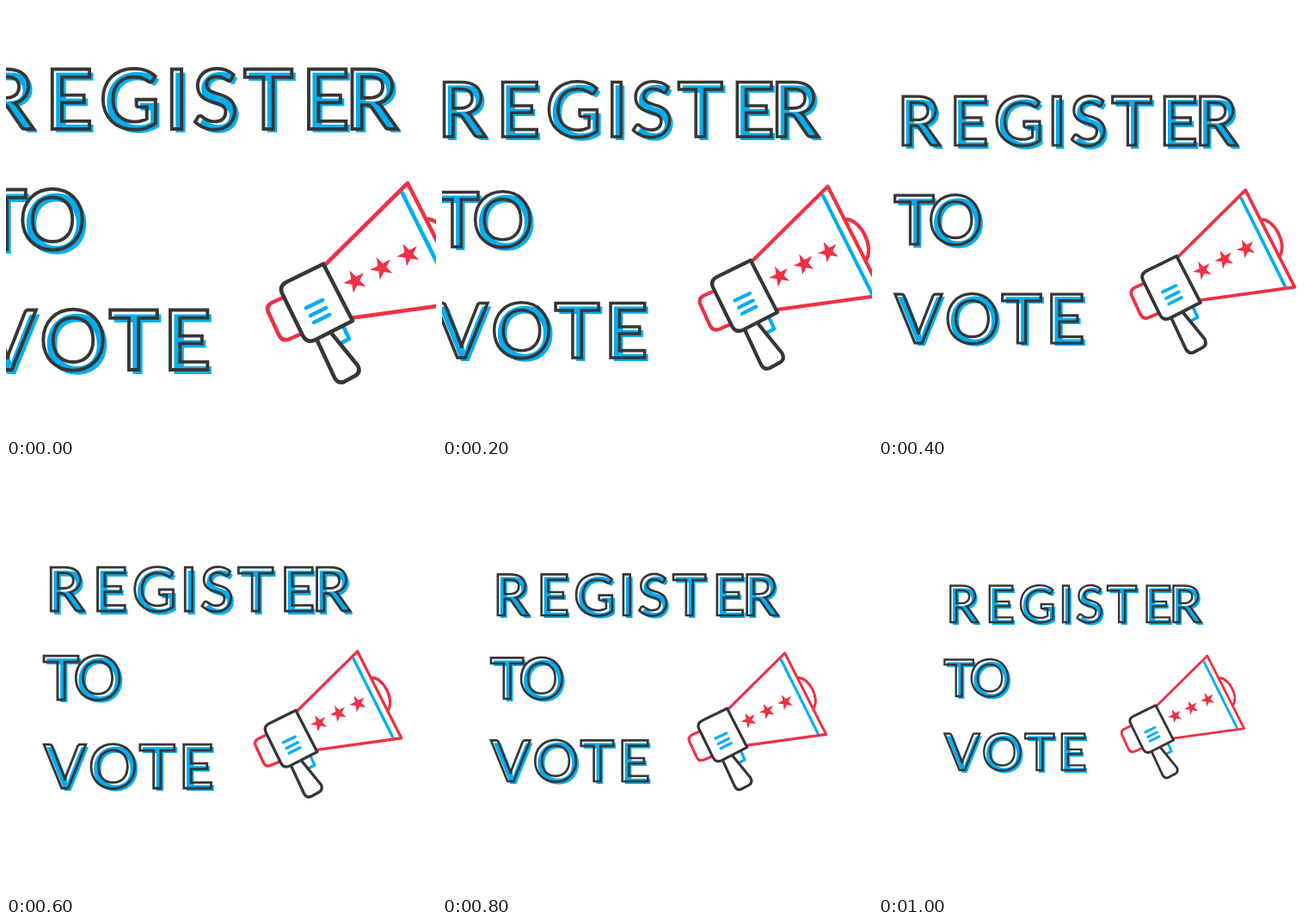
An HTML page that plays this animation: 500x500 px, repeating every 1200 ms.

```html
<!DOCTYPE html>
<html lang="en">
<head>
<meta charset="utf-8">
<title>Register to vote</title>
<style>
  html, body { margin: 0; width: 100%; height: 100%; overflow: hidden; background: #fff; }
  svg { display: block; width: 100%; height: 100%; }
  text { font: 600 96.5px Lato, Inter, sans-serif; text-anchor: middle; text-rendering: geometricPrecision; }
  .line { fill: none; stroke-linejoin: round; stroke-linecap: round; stroke-width: 4.6; }
  .red { stroke: #ee3145; }
  .blue { stroke: #00aeef; }
  .dark { stroke: #373536; fill: #fff; }
  .shade { fill: #00aeef; }
  .rim { fill: none; stroke: #373536; stroke-width: 3.9; }
</style>
</head>
<body>
<svg viewBox="0 0 500 500">
  <defs>
    <text id="words">
      <tspan x="2 73.3 144 198.5 243.5 305 371.5 437" y="142.5">REGISTER</tspan>
      <tspan x="-4.5 66" y="283">TO</tspan>
      <tspan x="1.5 78 148.5 210.5" y="423.3">VOTE</tspan>
    </text>
    <path id="star" d="M0-14L8.2 11.3-13.3-4.3H13.3L-8.2 11.3Z" fill="#ee3145"/>
  </defs>

  <g id="scene">
    <!-- Hollow lettering over an offset blue copy -->
    <use href="#words" class="shade" x="4.5" y="4.5"/>
    <use href="#words" class="rim"/>

    <!-- Megaphone -->
    <g class="line">
      <path class="red" d="M489 248C507 246 528 283 515 301"/>
      <path class="blue" stroke-linecap="butt" d="M460 216L524 344"/>
      <path class="red" d="M370 302L467 206 537 344 400 363"/>
      <path class="red" d="M320 340L309 345Q302 349 305 356L317 382Q321 391 330 387L344 381"/>
      <path class="blue" d="M393 374L399 387 388 393"/>
      <path class="dark" d="M361 387L381 430Q385 440 393 437L406 430Q413 426 409 418L378 380"/>
      <path class="dark" d="M328 320L369 300 403 366 360 388Q350 393 345 383L321 334Q317 325 328 320Z"/>
      <path class="blue" d="M349 351L368 342M354 360L372 351M358 368L376 359"/>
    </g>
    <use href="#star" transform="translate(406 320) rotate(-27)"/>
    <use href="#star" transform="translate(437 304.5) rotate(-27)"/>
    <use href="#star" transform="translate(468 289) rotate(-27)"/>
  </g>
</svg>
<script>
  const scene = document.getElementById("scene");
  const scales = [1, 0.915, 0.817, 0.731, 0.685, 0.6125];
  const stepMs = 200;
  const start = performance.now();

  // The whole picture shrinks towards the centre in held steps.
  function draw() {
    const step = Math.floor((performance.now() - start) / stepMs) % scales.length;
    scene.setAttribute("transform", `translate(250 250) scale(${scales[step]}) translate(-250 -250)`);
    requestAnimationFrame(draw);
  }
  draw();
</script>
</body>
</html>
```
